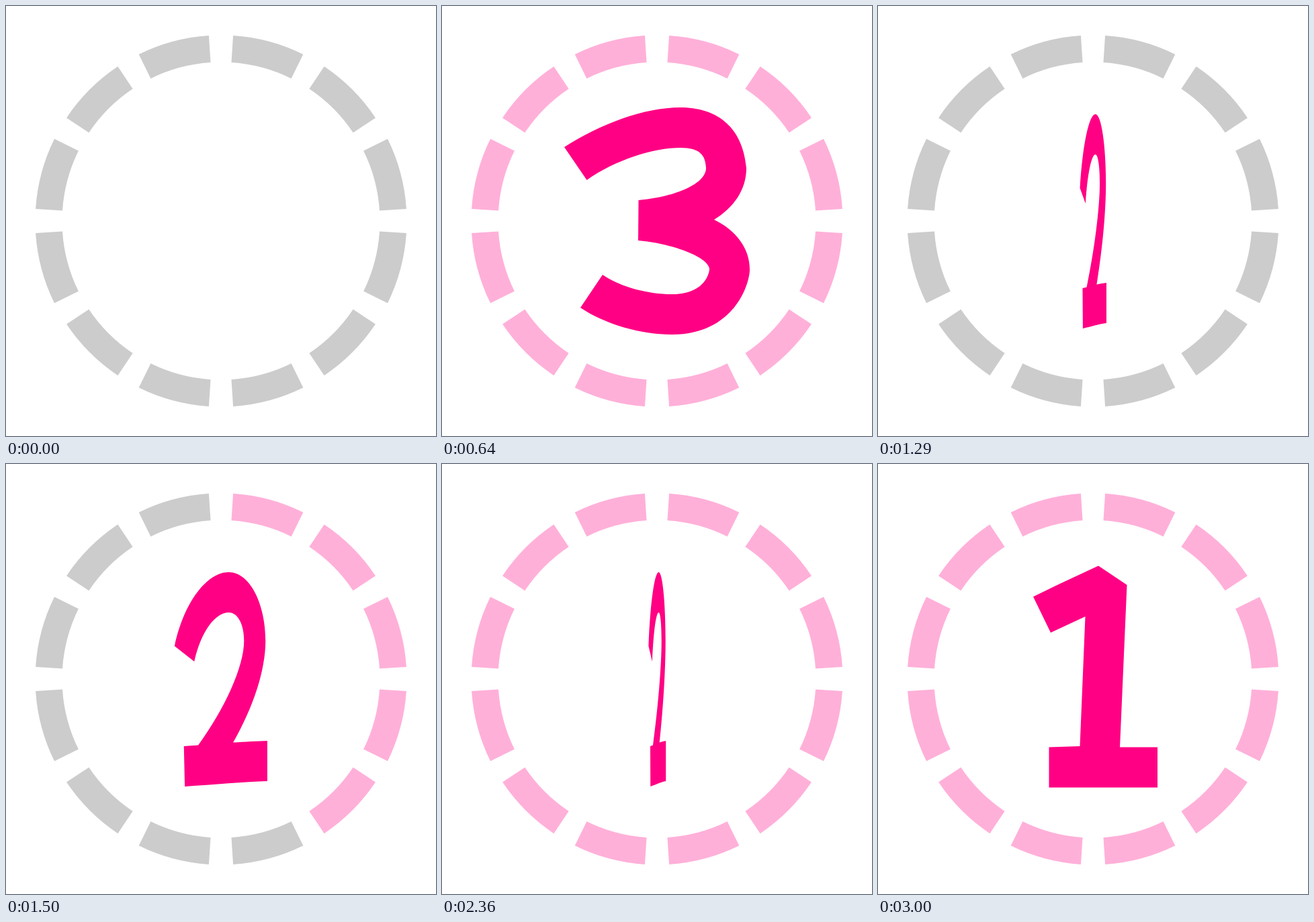
These frames come from a looping animation (640x640 px, 3.57 s). An HTML page with a canvas:

```html
<!DOCTYPE html>
<html lang="en">
<head>
<meta charset="utf-8">
<title>Countdown</title>
<style>
  html, body { margin: 0; width: 100%; height: 100%; overflow: hidden; background: #fff; }
  canvas { display: block; }
</style>
</head>
<body>
<canvas id="stage" width="640" height="640"></canvas>
<script>
const ctx = document.getElementById('stage').getContext('2d');
const SIZE = 640, MID = 320;
const LOOP = 3570, FPS = 14, LAST = 49;
const TURN = 1200;          // time given to each digit
const GROW = 563;           // digit opens
const HOLD = 800;           // digit starts to close
const GREY = '#cccccc', PALE = '#ffb0d9', PINK = '#ff0084';

// cx is the axis the digit is squeezed around
const digits = [
  { cx: 321.5, path: new Path2D(
    'M182 210C235 176 300 151 355 151C405 151 447 176 453 241' +
    'C453 274 434 300 405 318C438 334 458 361 458 392' +
    'C458 415 434 489 342 489C297 489 243 474 206 449L239 400' +
    'C267 419 308 429 342 429C390 429 398 399 398 391' +
    'C396 373 340 353 292 349L292.5 289C340 285 393 267 393 241' +
    'C392 222 384 211 355 211C315 211 258 229 215.5 259Z') },
  { cx: 320.4, path: new Path2D(
    'M190 271C217 204 282 161 341 161C401 161 444 209 444 263' +
    'C444 307 410 362 353.5 414.5C385 413.5 420 412.5 449 412L449 472' +
    'C385 473 300 477 218.5 480L216 420L256 418.5C330 364 384 302 384 263' +
    'C384 240 368 221 341 221C305 221 264 248 245 294Z') },
  { cx: MID, path: new Path2D(
    'M231 197.5L268 179.5L328 151.5L370.5 180L360 421.5H416V481.5H254.5' +
    'V421.5L300.5 420L308.5 227L257 251Z') }
];

const clamp = (v, lo, hi) => Math.min(hi, Math.max(lo, v));

function scaleAt(t, isLast) {
  if (t < GROW) return t / GROW;
  if (t < HOLD || isLast) return 1;
  const left = 1 - (t - HOLD) / (TURN - HOLD);
  return 0.93 * left + 0.07 * left ** 4;
}

function drawRing(lit) {
  const rad = Math.PI / 180;
  ctx.lineWidth = 40;
  for (let i = 0; i < 12; i++) {
    const from = i * 30 + 3.75 - 90;
    ctx.strokeStyle = i < lit ? PALE : GREY;
    ctx.beginPath();
    ctx.arc(MID, MID, 256.5, from * rad, (from + 22.5) * rad);
    ctx.stroke();
  }
}

function drawDigit({ cx, path }, scale) {
  if (scale <= 0) return;
  ctx.save();
  ctx.translate(cx, 0);
  ctx.scale(scale, 1);
  ctx.translate(-cx, 0);
  ctx.fillStyle = PINK;
  ctx.fill(path);
  ctx.restore();
}

// The picture steps at 14 per second, with starts rounded to 10 ms
const stepStart = k => Math.round(k * 100 / FPS) * 10;

function stepAt(ms) {
  let k = Math.min(LAST, Math.ceil(ms * FPS / 1000) + 1);
  while (k > 0 && stepStart(k) > ms) k--;
  return k;
}

function draw(ms) {
  const time = stepAt(ms) * 1000 / FPS;
  const n = Math.min(2, Math.floor(time / TURN));
  const t = time - n * TURN;
  ctx.fillStyle = '#fff';
  ctx.fillRect(0, 0, SIZE, SIZE);
  drawRing(clamp(Math.floor((t - 43) / 44.5), 0, 12));
  drawDigit(digits[n], scaleAt(t, n === 2));
}

const begin = performance.now();
function tick() {
  draw((performance.now() - begin) % LOOP);
  requestAnimationFrame(tick);
}
tick();
</script>
</body>
</html>
```
